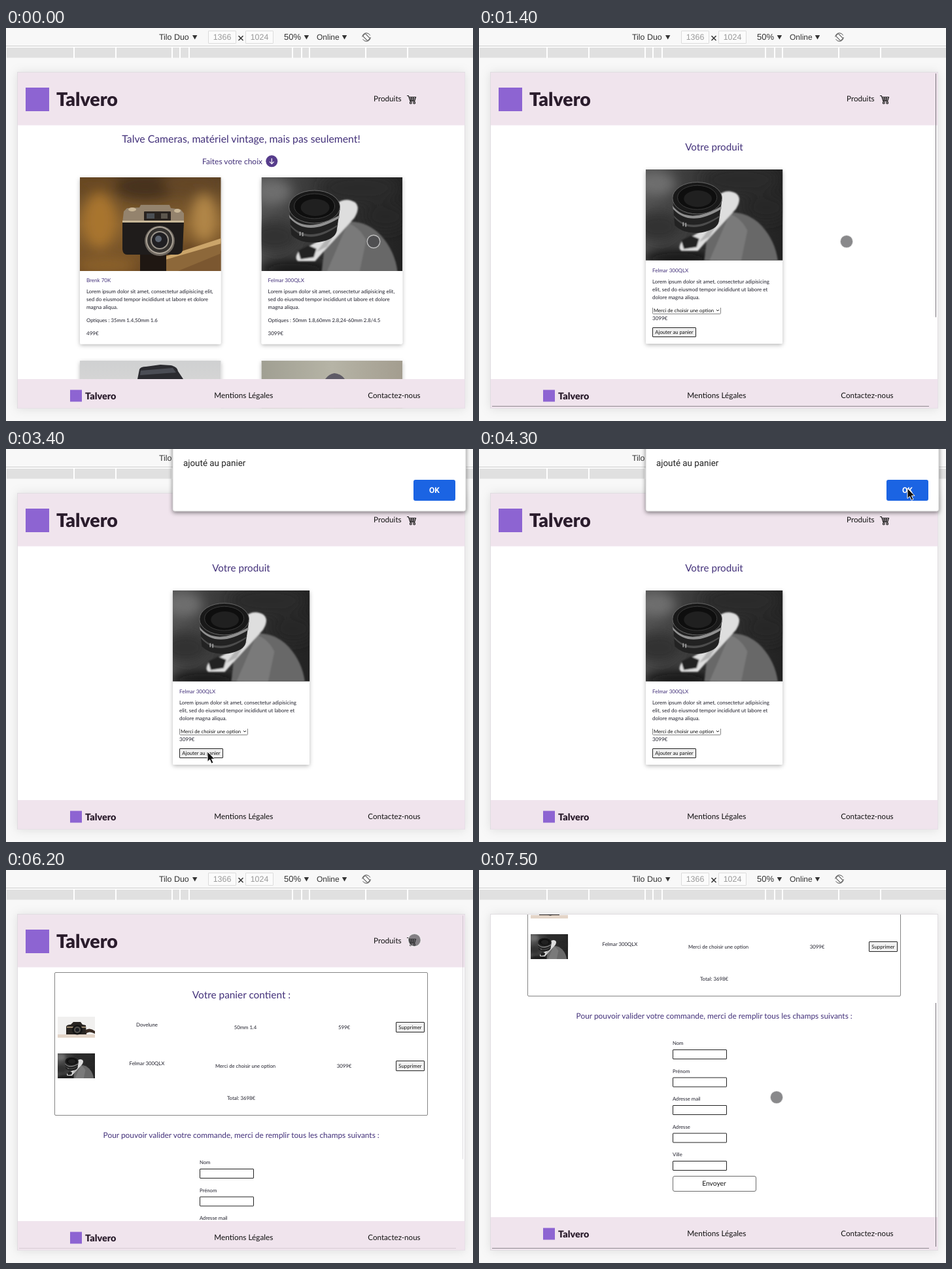
Write an HTML page that moves like this. It is 714x600 px and loops after 7.6 s.

```html
<!DOCTYPE html>
<html lang="fr">
<head>
<meta charset="utf-8">
<title>Boutique</title>
<style>
html, body { margin: 0; width: 100%; height: 100%; overflow: hidden; background: #f8f8f8; }
svg { display: block; width: 714px; height: 600px; }
text { font-family: Lato, "Open Sans", sans-serif; white-space: pre; text-rendering: geometricPrecision; }
.ui { font-family: "Liberation Sans", Arial, sans-serif; }
.alert { font-family: Roboto, sans-serif; }
</style>
</head>
<body>
<svg id="stage" viewBox="0 0 714 600"></svg>
<script>
const LOOP = 7600, STEP = 100;
const SHOP = 'Talvero', CAM_A = 'Brenk 70K', CAM_B = 'Felmar 300QLX', CAM_C = 'Dovelune';
const INK = '#20202c', PURPLE = '#43317a';
const PINK = '#f0e4ed';

// Markup helpers
const rect = (x, y, w, h, fill, more = '') =>
  `<rect x="${x}" y="${y}" width="${w}" height="${h}" fill="${fill}" ${more}/>`;
const path = (d, fill, more = '') => `<path d="${d}" fill="${fill}" ${more}/>`;
const oval = (x, y, rx, ry, fill, more = '') =>
  `<ellipse cx="${x}" cy="${y}" rx="${rx}" ry="${ry}" fill="${fill}" ${more}/>`;
const text = (x, y, size, s, fill = INK, more = '') =>
  `<text x="${x}" y="${y}" font-size="${size}" fill="${fill}" ${more}>${s}</text>`;
const mid = (x, y, size, s, fill = INK, more = '') =>
  text(x, y, size, s, fill, 'text-anchor="middle" ' + more);
const group = (id, body, more = '') => `<g id="${id}" ${more}>${body}</g>`;
const use = (id, x, y, k = 1) => `<use href="#${id}" transform="translate(${x} ${y}) scale(${k})"/>`;
const box = (x, y, w, h, fill = '#fff', stroke = '#222', rx = 0.5) =>
  rect(x + .5, y + .5, w - 1, h - 1, fill, `stroke="${stroke}" rx="${rx}"`);
const ramp = (id, dir, stops) => `<linearGradient id="${id}" ${dir}>` +
  stops.map(([o, c]) => `<stop offset="${o}" stop-color="${c}"/>`).join('') + '</linearGradient>';
const clip = (id, x, y, w, h) => `<clipPath id="${id}">${rect(x, y, w, h, '#000')}</clipPath>`;

const across = 'x1="0" y1="0" x2="1" y2="0"', down = 'x1="0" y1="0" x2="0" y2="1"';

const goldPhoto = rect(0, 0, 216, 143, 'url(#gold)') +
  `<g filter="url(#blur)">` +
  oval(30, 66, 26, 42, '#a8752f') + oval(18, 10, 40, 14, '#6b4a24') + oval(100, 14, 46, 20, '#46331f') +
  oval(170, 10, 44, 14, '#654625') + oval(190, 62, 20, 36, '#b08546') + oval(40, 134, 46, 14, '#8a6029') +
  oval(165, 120, 22, 18, '#664423') + '</g>' +
  path('M216 112L126 143H216Z', '#7b5730') + path('M216 98L132 123V143H150L216 116Z', '#8d683a') +
  path('M216 93L130 121V126L216 101Z', '#cba56a') +
  rect(92, 115, 40, 28, '#1f1712') +
  path('M67 52L72 47L91 46L93 42L137 42L139 47L154 49L159 55L159 70L65 70Z', '#94836d') +
  path('M65 67H159L157 112Q155 118 146 118H72Q66 118 65 110Z', '#1f1c1b') +
  rect(65, 66, 94, 3, '#c9b898') + rect(98, 52, 41, 14, '#29231f', 'rx="1"') +
  rect(102, 55, 12, 8, '#4b4f54') + rect(124, 55, 10, 8, '#5c564d') +
  oval(80, 49, 6, 3, '#c9b797') + oval(149, 51, 5, 3, '#c9b797') +
  oval(122, 97, 23, 23, '#6e675f') + oval(122, 96, 21, 21, '#aaa296') + oval(122, 96, 19, 19, '#35322f') +
  oval(122, 96, 14, 14, '#99938a') + oval(122, 96, 12, 12, '#201f22') + oval(120, 94, 5, 5, '#5c6470');

const greyPhoto = rect(0, 0, 216, 144, 'url(#dusk)') +
  `<g filter="url(#blur)">` + oval(16, 22, 30, 20, '#6e6e6e') + oval(20, 90, 36, 24, '#333') +
  oval(150, 16, 60, 24, '#2a2a2a') + oval(190, 60, 34, 22, '#252525') + oval(50, 140, 56, 14, '#181818') + '</g>' +
  `<g filter="url(#soft)">` +
  path('M132 68Q160 66 182 88Q204 112 208 144H92L96 110Z', '#686868') +
  path('M132 70Q150 76 160 96L150 144H100Z', '#7a7a7a') +
  path('M110 44Q126 28 143 38Q152 46 142 62L96 112L82 128H56Q50 124 56 114L82 100L108 84Z', '#dedede') +
  path('M104 88L118 78L100 106L84 114Z', '#b4b4b4') +
  path('M56 112L72 104L84 109L80 122L60 125Z', '#222') + '</g>' +
  path('M43 44Q44 80 46 88Q60 102 88 99Q112 95 115 82L120 48Z', '#222') +
  path('M42 57Q66 88 119 58V62Q70 92 43 62Z', '#909090') +
  path('M44 72Q70 102 117 72L116 75Q72 106 45 76Z', '#4c4c4c') +
  oval(81, 45, 39, 25, '#191919', 'stroke="#6a6a6a"') +
  oval(81, 44, 31, 19, '#0e0e0e', 'stroke="#3c3c3c"') + oval(82, 46, 22, 13, '#202020') +
  path('M58 83h2v6h-2zM62 84h2v6h-2z', '#999');

const whitePhoto = rect(0, 0, 57, 32, '#f1f0ef') + rect(0, 27, 57, 5, '#e4d5c8') +
  path('M13 15Q14 12 20 12L24 8H35L38 12L43 13L44 27H13Z', '#292522') + rect(14, 15, 29, 2, '#9d8b72') +
  oval(30, 20, 8, 7.5, '#151515') + oval(30, 20, 5, 5, '#56534d') + oval(30, 20, 3, 3, '#1b1d22') +
  path('M43 20Q50 16 57 22V26Q48 21 43 26Z', '#3b2d25');

const defs = '<defs>' +
  ramp('gold', down, [[0, '#5a4125'], [.5, '#86602f'], [1, '#6d4a24']]) +
  ramp('dusk', across, [[0, '#505050'], [.4, '#363636'], [1, '#222']]) +
  ramp('wall', down, [[0, '#cfd0d1'], [1, '#dedddb']]) +
  ramp('haze', across, [[0, '#a09f92'], [.5, '#b6b4a6'], [1, '#a39d8f']]) +
  '<filter id="blur" x="-20%" y="-20%" width="140%" height="140%"><feGaussianBlur stdDeviation="9"/></filter>' +
  '<filter id="soft"><feGaussianBlur stdDeviation="1.2"/></filter>' +
  '<filter id="lift" x="-10%" y="-10%" width="120%" height="120%"><feDropShadow dx="0" dy="2" stdDeviation="3" flood-opacity=".28"/></filter>' +
  '<filter id="glow" x="-5%" y="-5%" width="110%" height="110%"><feDropShadow dx="0" dy="1" stdDeviation="8" flood-opacity=".1"/></filter>' +
  '<filter id="drop" x="-5%" y="-20%" width="110%" height="150%"><feDropShadow dx="0" dy="2" stdDeviation="3" flood-opacity=".5"/></filter>' +
  clip('view', 18, 68, 683.5, 512.5) + clip('photo', 0, 0, 215.5, 143) + clip('thumb', 0, 0, 57, 32) +
  group('gold-cam', goldPhoto, 'clip-path="url(#photo)"') +
  group('grey-cam', greyPhoto, 'clip-path="url(#photo)"') +
  group('white-cam', whitePhoto, 'clip-path="url(#thumb)"') + '</defs>';

// Browser toolbar and ruler
const arrowDown = x => path(`M${x} 11h7.4l-3.7 6.4z`, '#333');
const gaps = [104, 168, 254, 266, 280, 438, 452, 464, 550, 614];
const ui = (x, s, size = 12) => text(x, 18, size, s, '#333', 'class="ui"');
const sizeBox = (x, s) => box(x, 4, 43, 20, '#fbfbfb', '#dcdcdc') + mid(x + 21.5, 18, 12.4, s, '#999', 'class="ui"');
const toolbar = rect(0, 0, 714, 600, '#f8f8f8') + rect(0, 27, 714, 1, '#cfcfcf') + rect(0, 28, 714, 18, '#fbfbfb') +
  rect(1, 30, 713, 15.5, '#e0e0e0') + gaps.map(x => rect(x - 1, 29, 2, 17, '#fff')).join('') +
  ui(234, 'Tilo Duo', 12.4) + arrowDown(285) + sizeBox(309, '1366') + sizeBox(366, '1024') +
  path('M355.5 12l7 7m0-7l-7 7', 'none', 'stroke="#333" stroke-width="1.5"') +
  ui(425, '50%', 13) + arrowDown(455.7) + ui(475, 'Online') + arrowDown(513.8) +
  '<g fill="none" stroke="#555"><circle cx="551" cy="14" r="6.3" stroke-dasharray="16 3.8"/>' +
  '<rect x="548.4" y="8.8" width="5.2" height="10.4" rx="1" transform="rotate(-45 551 14)"/></g>';

const basketIcon = '<g stroke="#111" fill="none" stroke-width="1.1">' +
  '<path d="M613 103.5h2.4l2.6 8.3h7.6M616 105.5h10.5l-1.4 4.6h-7.6M616.7 107.8h9M619.5 105v5M622.5 105v5"/>' +
  '<circle cx="618.8" cy="114.3" r="1.4"/><circle cx="624.2" cy="114.3" r="1.4"/></g>';

const header = rect(18, 68, 684, 80.5, PINK) + rect(30, 91, 36, 36, '#8d64d2') +
  text(77, 119, 28.5, SHOP, '#2a1c2c', 'font-weight="900"') +
  text(562, 112, 11.7, 'Produits', '#111') + basketIcon;

const footer = rect(18, 536, 684, 50, PINK) + rect(98, 552.5, 18, 18, '#8d64d2') +
  text(121, 567, 14.4, SHOP, '#2a1c2c', 'font-weight="900"') +
  mid(363.3, 565, 11.8, 'Mentions Légales', '#111') + mid(593.5, 565, 11.6, 'Contactez-nous', '#111');

const lines = (x, y, list) => list.map((s, i) => text(x, y + 12 * i, 8, s)).join('');
const panel = (x, y, w, h) => rect(x, y, w, h, '#fff', 'rx="2" filter="url(#lift)"');

// Pages
const card = (x, photo, name, lenses, price) => panel(x, 228, 215.5, 254.5) + use(photo, x, 228) +
  text(x + 10, 388, 8, name, PURPLE) +
  lines(x + 10, 405, ['Lorem ipsum dolor sit amet, consectetur adipisicing elit,',
    'sed do eiusmod tempor incididunt ut labore et dolore', 'magna aliqua.']) +
  text(x + 10, 449, 7.8, 'Optiques : ' + lenses) + text(x + 10, 469, 8, price);

const home = mid(359.5, 175, 15.8, 'Talve Cameras, matériel vintage, mais pas seulement!', PURPLE) +
  text(300, 208, 12, 'Faites votre choix', PURPLE) + oval(406.3, 203.3, 9, 9, '#573d8c') +
  path('M406.3 199v8.5m-3.3-3.3l3.3 3.3l3.3-3.3', 'none', 'stroke="#fff" stroke-width="1.2"') +
  card(113, 'gold-cam', CAM_A, '35mm 1.4,50mm 1.6', '499€') +
  card(390.6, 'grey-cam', CAM_B, '50mm 1.8,60mm 2.8,24-60mm 2.8/4.5', '3099€') +
  panel(113, 508, 215.5, 80) + rect(113, 508, 215.5, 80, 'url(#wall)') +
  path('M201 536L204 521Q206 517 214 517L236 514L252 515Q262 517 263 524L271 536Z', '#2b2b30') +
  path('M206 523L255 519L260 526L205 530Z', '#4b4d55') +
  panel(390.6, 508, 215.5, 80) + rect(390.6, 508, 215.5, 80, 'url(#haze)') +
  path('M488 536Q494 528 502 527Q512 528 518 536Z', '#5f5b66');

const product = mid(359.5, 187, 15.2, 'Votre produit', PURPLE) +
  panel(255, 216, 209, 266) + use('grey-cam', 255, 216, .971) +
  text(265, 373, 8, CAM_B, PURPLE) +
  lines(265, 390, ['Lorem ipsum dolor sit amet, consectetur adipisicing',
    'elit, sed do eiusmod tempor incididunt ut labore et', 'dolore magna aliqua.']) +
  path('M265.5 427V435.5q0 1 1 1H368.5q1 0 1-1V427', '#fff', 'stroke="#777" stroke-width=".9"') +
  text(267, 434, 7.7, 'Merci de choisir une option', '#111') +
  path('M363 430l2 2l2-2', 'none', 'stroke="#222"') +
  text(265, 446, 8, '3099€') + box(265, 457, 67, 15, '#efefef') + mid(298.5, 467.3, 7.7, 'Ajouter au panier', '#111');

const row = (y, name, option, price) => mid(215.5, y - 4, 7.8, name) + mid(366, y, 7.7, option) +
  mid(517, y, 7.8, price) + box(596, y - 11, 44, 16, '#f2f2f2') + mid(618, y - .2, 7.8, 'Supprimer', '#111');
const field = (y, label) => text(296, y, 7.7, label) + box(296, y + 7, 83, 15);

const basket = box(74, 156, 571, 219, '#fff', '#858585', 1.5) +
  mid(360, 196, 15.4, 'Votre panier contient :', PURPLE) +
  use('white-cam', 79, 224) + use('grey-cam', 79, 280, .265) +
  row(243, CAM_C, '50mm 1.4', '599€') + row(302, CAM_B, 'Merci de choisir une option', '3099€') +
  mid(359.5, 351, 7.8, 'Total: 3698€') +
  mid(359.7, 409, 11.9, 'Pour pouvoir valider votre commande, merci de remplir tous les champs suivants :', PURPLE) +
  ['Nom', 'Prénom', 'Adresse mail', 'Adresse', 'Ville'].map((s, i) => field(449 + 42.5 * i, s)).join('') +
  box(296, 649, 128, 24, '#fff', '#6c6c6c', 2.5) + mid(359.5, 664.3, 10.3, 'Envoyer', '#111');

const dialog = rect(255, -8, 448, 103, '#fff', 'rx="3" stroke="#b5b5b5" stroke-width=".6" filter="url(#drop)"') +
  text(271, 26, 13.4, 'ajouté au panier', '#222', 'class="alert"') +
  rect(623, 47, 64, 32, '#1b64e3', 'rx="3"') + mid(655, 67.3, 12, 'OK', '#fff', 'class="alert" font-weight="700"');

const bar = 'stroke="#77727a" stroke-width="1"';
document.getElementById('stage').innerHTML = defs + toolbar +
  rect(17.5, 67.5, 684, 513, '#fff', 'stroke="#e0dde1" filter="url(#glow)"') +
  '<g clip-path="url(#view)">' +
  group('scroll', header + group('home', home) + group('product', product) + group('basket', basket)) +
  group('footer', footer) +
  group('bars', `<path id="thumb-y" d="M698.5 0V372" ${bar}/><path d="M20 577.5H688" ${bar} opacity=".8"/>`) + '</g>' +
  group('dialog', dialog) +
  group('dot', oval(0, 0, 9.8, 9.8, 'rgba(64,64,68,.62)', 'stroke="#fff" stroke-opacity=".6" stroke-width="1.4"')) +
  group('arrow', path('M0 -2V13.5L3.6 10.3L6.2 16.2L9 15L6.4 9.3H11Z', '#111', 'stroke="#fff"'));

// Motion
const TO_PRODUCT = 1400, ALERT_ON = 3200, ALERT_OFF = 4500, TO_BASKET = 5800;
const SCROLL_FROM = 6850, SCROLL_TO = 7400, SCROLL_BY = 182;
const pointer = [[0, 562, 326], [1500, 562, 326], [2100, 332, 452], [2400, 308, 464], [3400, 308, 464],
  [4100, 655, 62], [4500, 655, 62], [5100, 624.5, 107], [6300, 624.5, 107], [6800, 455, 347], [LOOP, 455, 347]];

const $ = id => document.getElementById(id);
const clamp = v => Math.min(1, Math.max(0, v));
const ease = v => { v = clamp(v); return v * v * (3 - 2 * v); };
const show = (id, on) => $(id).setAttribute('visibility', on ? 'visible' : 'hidden');
const move = (id, x, y, more = '') => $(id).setAttribute('transform', `translate(${x} ${y}) ${more}`);

function pointerAt(t) {
  const i = pointer.findIndex(k => k[0] > t);
  const [t0, x0, y0] = pointer[i - 1], [t1, x1, y1] = pointer[i];
  const k = ease((t - t0) / (t1 - t0));
  return [x0 + (x1 - x0) * k, y0 + (y1 - y0) * k];
}

// Overlay scrollbars flash after a page change
const flash = dt => dt < 0 ? 0 : clamp((450 - dt) / 200);

function draw(t) {
  const inBasket = t >= TO_BASKET, inProduct = t >= TO_PRODUCT && !inBasket;
  const alert = t >= ALERT_ON && t < ALERT_OFF;
  const y = SCROLL_BY * ease((t - SCROLL_FROM) / (SCROLL_TO - SCROLL_FROM));
  show('home', !inProduct && !inBasket);
  show('product', inProduct);
  show('basket', inBasket);
  move('scroll', 0, -y);
  move('footer', 0, Math.min(0, 176 - y));
  move('thumb-y', 0, 69.5 + y * 133.5 / SCROLL_BY);
  $('bars').setAttribute('opacity', t >= SCROLL_FROM ? 1 : flash(t - (inBasket ? TO_BASKET : TO_PRODUCT)));

  const opening = t < ALERT_ON + STEP;
  show('dialog', alert);
  move('dialog', opening ? 479 * .085 : 0, 0, opening ? 'scale(.915)' : '');
  $('dialog').setAttribute('opacity', opening ? .7 : 1);

  const [px, py] = pointerAt(t);
  show('dot', !alert);
  show('arrow', alert);
  move('dot', px, py);
  move('arrow', px, py);
}

const start = performance.now();
function tick() {
  const t = (performance.now() - start) % LOOP;
  draw(Math.floor(t / STEP) * STEP);
  requestAnimationFrame(tick);
}
tick();
</script>
</body>
</html>
```
